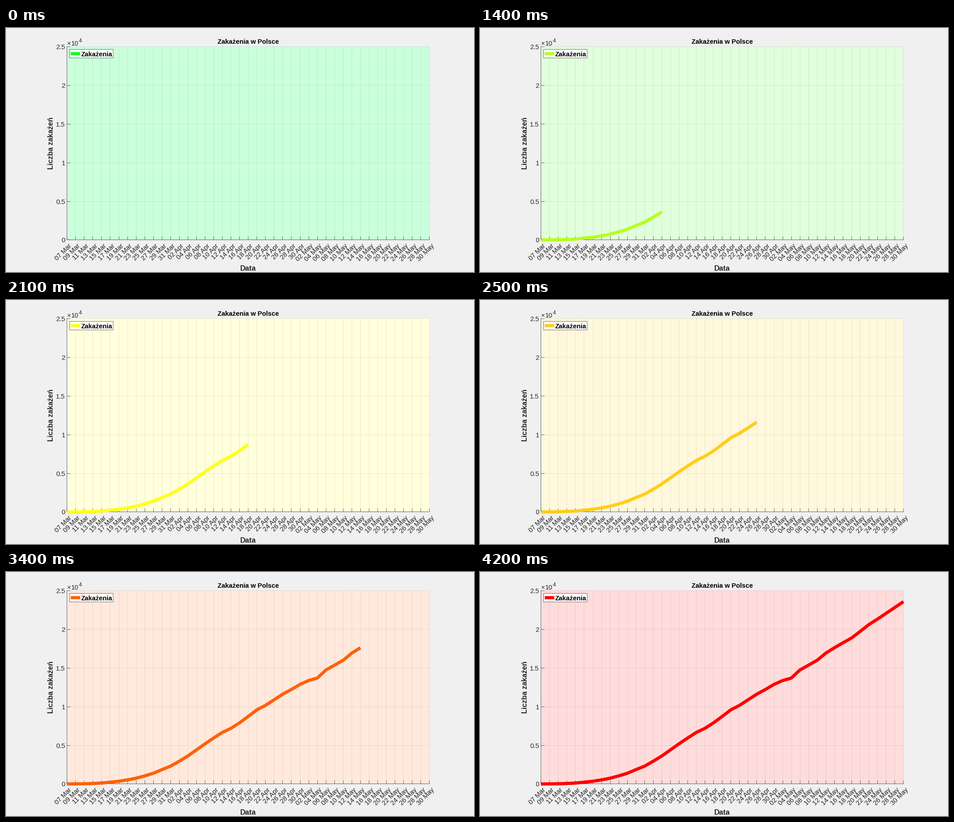
A matplotlib script that plays this animation: 1033 by 542 pixels, repeating every 6.3 s.

```python
import matplotlib.pyplot as plt
from matplotlib.animation import FuncAnimation
from matplotlib.patches import Rectangle

W, H, DPI = 1033, 542, 64
PT = 72 / DPI  # points per pixel
LEFT, RIGHT, TOP, BOTTOM = 134.75, 934.75, 41.3, 470.95
Y_MAX = 25000
INK = (38 / 255,) * 3
THIN, THICK = 0.67, 7.1

# Cumulative cases, every second day from 7 March
CASES = [6, 17, 31, 68, 125, 238, 355, 536, 749, 1051, 1389, 1862, 2311, 2946,
         3627, 4413, 5205, 5955, 6674, 7202, 7918, 8742, 9593, 10169, 10892,
         11617, 12218, 12877, 13375, 13693, 14740, 15366, 15996, 16921, 17615,
         18257, 18885, 19739, 20619, 21326, 22074, 22825, 23571]
LAST = len(CASES) - 1
HALF = LAST // 2
FRAMES = 63

plt.rcParams["font.family"] = "Liberation Sans"
fig = plt.figure(figsize=(W / DPI, H / DPI), dpi=DPI,
                 facecolor=(240 / 255,) * 3)
ax = fig.add_axes([0, 0, 1, 1])
ax.set_xlim(0, W)
ax.set_ylim(H, 0)
ax.axis("off")


def x_at(i):
    return LEFT + (RIGHT - LEFT) * i / LAST


def y_at(value):
    return BOTTOM - (BOTTOM - TOP) * value / Y_MAX


def crisp(v):
    return int(v) + 0.5


def stroke(xs, ys, width=THIN, color=INK, **kw):
    return ax.plot(xs, ys, color=color, lw=width * PT, snap=False,
                   solid_capstyle="butt", solid_joinstyle="round", **kw)[0]


def text(x, y, s, size=14.67, color=INK, ha="left", **kw):
    ax.text(x, y, s, size=size * PT, color=color, ha=ha, va="baseline",
            rotation_mode="anchor", **kw)


def date_label(i):
    day = 7 + 2 * i
    for month, length in (("Mar", 31), ("Apr", 30), ("May", 31)):
        if day <= length:
            return f"{day:02d} {month}"
        day -= length


def colours(i):
    """Line and background colours once point i has been reached."""
    if i < HALF:
        t = (i + 1) / HALF
        line, back = (255 * t, 255, 30), (200 + 35 * t, 255, 220)
    else:
        t = (LAST - i) / HALF
        line, back = (255, 255 * t, 30 * t), (255, 220 + 35 * t, 220)
    return [tuple(c / 255 for c in rgb) for rgb in (line, back)]


# Plot area, grid, ticks and axes
area = ax.add_patch(Rectangle((135, 41), 800, 429.5, lw=0, snap=False))

for i in range(LAST + 1):
    x = crisp(x_at(i))
    stroke([x, x], [41, 470], alpha=0.14)
    stroke([x, x], [463, 470.5])
    text(x_at(i) + 11, 484.5, date_label(i), ha="right", rotation=45)

for value, label in zip(range(0, Y_MAX + 1, 5000),
                        ("0", "0.5", "1", "1.5", "2", "2.5")):
    y = crisp(y_at(value))
    stroke([135, 935], [y, y], alpha=0.14)
    stroke([134.5, 142.5], [y, y])
    text(130.5, y + 5.5, label, ha="right")

stroke([134.5, 134.5], [41, 471])
stroke([134, 935], [470.5, 470.5])

# Titles
text(535, 35, "Zakażenia w Polsce", 14.5, "black", "center", weight="bold")
text(534.5, 538.7, "Data", 16.1, ha="center", weight="bold")
text(103.9, 256, "Liczba zakażeń", 16, ha="center", weight="bold",
     rotation=90)
text(135, 38.7, "×")
text(143.8, 38.7, "10")
text(160.3, 31.5, "4", 11.7)

# Curve and legend
curve = stroke([], [], THICK, zorder=4)
ax.add_patch(Rectangle((140.5, 47.5), 96, 19, fc="white", ec=INK,
                       lw=THIN * PT, snap=False, zorder=5))
sample = stroke([143, 164], [57, 57], THICK, zorder=6)
text(165.3, 62.6, "Zakażenia", 14.5, "black", weight="bold", zorder=6)


def draw(frame):
    i = min(frame, LAST)
    line, back = colours(i)
    curve.set_data([x_at(k) for k in range(i + 1)],
                   [y_at(v) for v in CASES[:i + 1]])
    curve.set_color(line)
    sample.set_color(line)
    area.set_facecolor(back)
    return curve, sample, area


anim = FuncAnimation(fig, draw, frames=FRAMES, interval=100,
                     repeat=True, repeat_delay=0)
plt.show()
```
